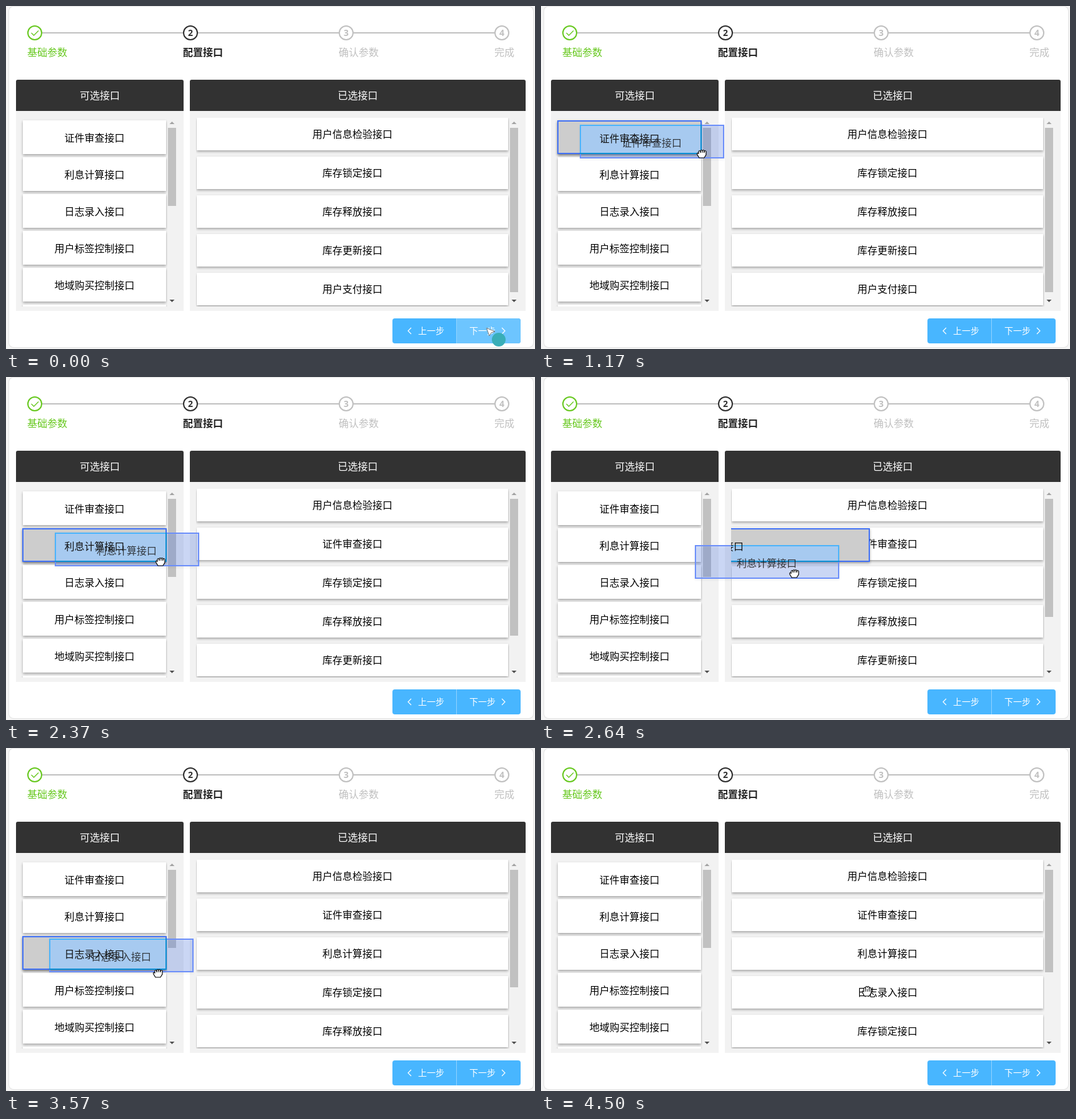
These frames come from a looping animation (846x549 px, 5490 ms). An HTML page with a canvas:

```html
<!DOCTYPE html>
<html lang="zh-CN">
<head>
<meta charset="utf-8">
<style>
  html, body { margin: 0; width: 100%; height: 100%; overflow: hidden; background: #f5f5f5; }
  canvas { display: block; }
</style>
</head>
<body>
<canvas id="stage" width="846" height="549"></canvas>
<script>
const ctx = document.getElementById('stage').getContext('2d');
const LOOP = 5490, STEP = 30, SETTLE = 150;
const CJK = '"Noto Sans CJK SC", "Noto Sans CJK", "Noto Sans CJK JP", sans-serif';
const SOURCE = ['证件审查接口', '利息计算接口', '日志录入接口', '用户标签控制接口', '地域购买控制接口'];
const CHOSEN = ['用户信息检验接口', '库存锁定接口', '库存释放接口', '库存更新接口', '用户支付接口'];

// Each drag copies one source item into the chosen list at index item + 1.
const DRAGS = [
  { item: 0, start: 1080, enter: 1440, drop: 1680, from: [195, 46], to: [194, 45] },
  { item: 1, start: 2250, enter: 2640, drop: 2940, from: [170, 46], to: [150, 44] },
  { item: 2, start: 3510, enter: 3800, drop: 4110, from: [174, 55], to: [174, 55] }
];

// time, x, y, eased
const PATH = [
  [30, 281, 281], [630, 281, 281], [1050, 222, 229, 1], [1170, 257, 236],
  [1530, 505, 260], [1680, 514, 268], [1770, 514, 268], [2220, 196, 288, 1],
  [2370, 247, 295], [2880, 546, 330], [2940, 548, 331], [3450, 200, 356, 1],
  [3510, 202, 356], [3900, 469, 382], [4110, 506, 388], [4500, 521, 390, 1]
];

const lerp = (a, b, p) => a + (b - a) * p;
const clamp = p => Math.max(0, Math.min(1, p));
const smooth = p => p * p * (3 - 2 * p);

// CSS "ease", cubic-bezier(.25, .1, .25, 1)
function ease(x) {
  let lo = 0, hi = 1;
  for (let i = 0; i < 20; i++) {
    const s = (lo + hi) / 2;
    const bx = .75 * s * (1 - s) ** 2 + .75 * s * s * (1 - s) + s ** 3;
    if (bx < x) lo = s; else hi = s;
  }
  return .3 * lo * (1 - lo) ** 2 + 3 * lo * lo * (1 - lo) + lo ** 3;
}

function cursorAt(t) {
  if (t < 30) return [768, 515];
  const i = PATH.findIndex(k => k[0] > t);
  if (i < 0) return PATH[PATH.length - 1].slice(1, 3);
  const a = PATH[i - 1], b = PATH[i];
  let p = (t - a[0]) / (b[0] - a[0]);
  if (b[3]) p = smooth(p);
  return [Math.round(lerp(a[1], b[1], p)), Math.round(lerp(a[2], b[2], p))];
}

function box(x, y, w, h, color, radius = 0) {
  ctx.fillStyle = color;
  ctx.beginPath();
  ctx.roundRect(x, y, w, h, radius);
  ctx.fill();
}

function frame(r, color) {
  ctx.strokeStyle = color;
  ctx.lineWidth = 2;
  ctx.strokeRect(r.x + 1, r.y + 1, r.w - 2, r.h - 2);
}

function poly(points, color, width) {
  ctx.beginPath();
  points.forEach(([x, y]) => ctx.lineTo(x, y));
  if (width) {
    ctx.strokeStyle = color;
    ctx.lineWidth = width;
    ctx.stroke();
  } else {
    ctx.fillStyle = color;
    ctx.fill();
  }
}

function label(text, x, y, color, size = 16, weight = 400, family = CJK) {
  ctx.font = `${weight} ${size}px ${family}`;
  ctx.textAlign = 'center';
  ctx.textBaseline = 'alphabetic';
  ctx.fillStyle = color;
  ctx.fillText(text, x, y + Math.round(size * .37));
}

function clipped(x, y, w, h, draw) {
  ctx.save();
  ctx.beginPath();
  ctx.rect(x, y, w, h);
  ctx.clip();
  draw();
  ctx.restore();
}

function shadowed(draw, alpha) {
  ctx.save();
  ctx.shadowColor = `rgba(0,0,0,${alpha})`;
  ctx.shadowBlur = 4;
  ctx.shadowOffsetY = 2;
  draw();
  ctx.restore();
}

function card(text, x, y, w, h, textY) {
  shadowed(() => box(x, y, w, h, '#fff'), .33);
  label(text, x + w / 2, textY, '#000');
}

function highlight(r) {
  shadowed(() => box(r.x, r.y, r.w, r.h, '#cdcdcd'), .3);
  frame(r, '#4272f5');
  label(r.text, r.x + r.w / 2, r.y + 29, '#111');
}

function steps() {
  const names = ['基础参数', '配置接口', '确认参数', '完成'];
  const colors = ['#67c81f', '#303030', '#c0c0c0', '#c0c0c0'];
  names.forEach((name, i) => {
    const x = 46 + 249 * i, color = colors[i];
    if (i < 3) box(x + 12, 42, 225, 2, '#c0c0c0');
    ctx.beginPath();
    ctx.arc(x, 43, 11, 0, Math.PI * 2);
    ctx.strokeStyle = color;
    ctx.lineWidth = 2;
    ctx.stroke();
    if (i) label(i + 1, x, 43, color, 14, 700, '"Open Sans", sans-serif');
    else poly([[40.5, 43], [44.5, 47], [52, 39.5]], color, 1.3);
    label(name, x - 12 + name.length * 8, 74, i === 1 ? '#222' : color, 16, i === 1 ? 700 : 400);
  });
}

function scrollbar(x, length) {
  box(x, 195, 13, length, '#c1c1c1');
  const c = x + 6.5;
  poly([[c - 4, 189], [c, 185], [c + 4, 189]], '#a3a3a3');
  poly([[c - 4, 470], [c, 474], [c + 4, 470]], '#505050');
}

function buttons(hover) {
  box(618, 500, 205, 40, '#48b6ff', 4);
  if (hover) box(721, 500, 102, 40, '#6dc5ff', [0, 4, 4, 0]);
  box(720, 500, 1, 40, '#91d3ff');
  label('上一步', 680, 520, '#fff', 14);
  label('下一步', 762, 520, '#fff', 14);
  poly([[648, 515], [643, 520], [648, 525]], '#fff', 1.2);
  poly([[793, 515], [798, 520], [793, 525]], '#fff', 1.2);
}

function panel(x, w, title) {
  box(x, 118, w, 370, '#f2f2f2');
  box(x, 118, w, 50, '#323232', [3, 3, 0, 0]);
  label(title, x + w / 2, 143, '#fff');
}

function sourceList(drag) {
  clipped(20, 175, 238, 306, () => {
    SOURCE.concat('').forEach((text, i) => card(text, 27, 183 + 59 * i, 229, 54, 211 + 59 * i));
    if (drag) highlight(drag);
  });
}

function chosenList(items, slot, progress, held) {
  clipped(304, 179, 501, 302, () => {
    items.forEach((text, i) => {
      const moved = slot && i >= slot ? 59 * progress : 0;
      const y = 179 + 62 * i + moved;
      card(text, 305, y, 498, 52, y + 26);
    });
    if (held) highlight(held);
  });
}

function drawGhost(g, held) {
  shadowed(() => box(g.x, g.y, g.w, g.h, 'rgba(80,130,255,.24)'), .25);
  frame(g, '#6c8ffa');
  const left = Math.max(held.x, held.minX);
  clipped(left, held.y, held.x + held.w - left, held.h, () => {
    clipped(g.x, g.y, g.w, g.h, () => {
      box(g.x, g.y, g.w, g.h, '#a7caf0');
      frame(g, '#4cb4fb');
      frame(held, '#0c90d6');
      label(held.text, held.x + held.w / 2, held.y + 29, '#111');
    });
  });
  label(g.text, g.x + 115, g.y + 29, 'rgba(25,25,25,.82)');
}

function hand(x, y, closed) {
  const tops = closed ? [-4, -5, -5, -4] : [-6, -8, -8, -6];
  ctx.save();
  ctx.translate(x, y);
  ctx.beginPath();
  ctx.moveTo(-4, 7);
  ctx.lineTo(-7, closed ? 2 : 1);
  ctx.quadraticCurveTo(-8, -2, -5, 0);
  tops.forEach((top, i) => {
    const fx = -5 + i * 3;
    ctx.lineTo(fx, top + 1);
    ctx.quadraticCurveTo(fx + 1.5, top - 2, fx + 3, top + 1);
  });
  ctx.lineTo(7, 2);
  ctx.lineTo(4, 7);
  ctx.closePath();
  ctx.fillStyle = '#fff';
  ctx.strokeStyle = '#000';
  ctx.lineWidth = 1.2;
  ctx.fill();
  ctx.stroke();
  for (const fx of [-2, 1, 4]) poly([[fx, -4], [fx, closed ? -1 : 0]], '#000', 1);
  ctx.restore();
}

function pointer(x, y) {
  const arrow = [[x + .5, y + .5], [x + 14, y + 6], [x + 8, y + 8], [x + 5, y + 13], [x + .5, y + .5]];
  poly(arrow, '#fff');
  poly(arrow, '#777', 1);
  ctx.beginPath();
  ctx.arc(x + 20, y + 19, 11, 0, Math.PI * 2);
  ctx.fillStyle = '#39aeb8';
  ctx.fill();
}

function drawCursor(x, y, dragging) {
  const overItem = y < 481 && ((x > 26 && x < 257) || (x > 304 && x < 804));
  if (dragging || overItem) hand(x, y, dragging);
  else pointer(x, y);
}

function render(t) {
  const [cx, cy] = cursorAt(t);
  const drag = DRAGS.find(d => t >= d.start && t < d.drop);
  const items = CHOSEN.slice();
  DRAGS.filter(d => t >= d.drop).forEach(d => items.splice(d.item + 1, 0, SOURCE[d.item]));

  let ghost, held, slot = 0, progress = 0;
  if (drag) {
    const text = SOURCE[drag.item], sourceY = 183 + 59 * drag.item;
    const p = clamp((t - drag.start - 90) / (drag.drop - drag.start - 150));
    ghost = {
      text, w: 231, h: 54,
      x: cx - Math.round(lerp(drag.from[0], drag.to[0], p)),
      y: cy - Math.round(lerp(drag.from[1], drag.to[1], p))
    };
    if (t >= drag.enter) {
      slot = drag.item + 1;
      progress = ease(clamp((t - drag.enter) / SETTLE));
      held = {
        text, w: 500, h: 54, minX: 304,
        x: Math.round(lerp(26, 304, progress)),
        y: Math.round(lerp(sourceY, 178 + 62 * slot, progress))
      };
    } else {
      held = { text, x: 26, y: sourceY, w: 231, h: 54, minX: 26 };
    }
  }

  box(0, 0, 846, 549, '#f5f5f5');
  box(4, 0, 840, 547, '#e2e2e2', 8);
  box(5, 1, 838, 545, '#fff', 7);
  steps();
  panel(16, 268, '可选接口');
  panel(294, 537, '已选接口');
  sourceList(slot ? null : held);
  chosenList(items, slot, progress, slot ? held : null);
  scrollbar(259, 125);
  const count = items.length + (slot ? 1 : 0);
  scrollbar(806, Math.round(1315 / count) + (slot ? 1 : 0));
  buttons(t < 30);
  if (ghost) drawGhost(ghost, held);
  drawCursor(cx, cy, Boolean(drag));
}

const began = performance.now();
function tick() {
  const t = (performance.now() - began) % LOOP;
  render(Math.floor(t / STEP) * STEP);
  requestAnimationFrame(tick);
}
tick();
</script>
</body>
</html>
```
